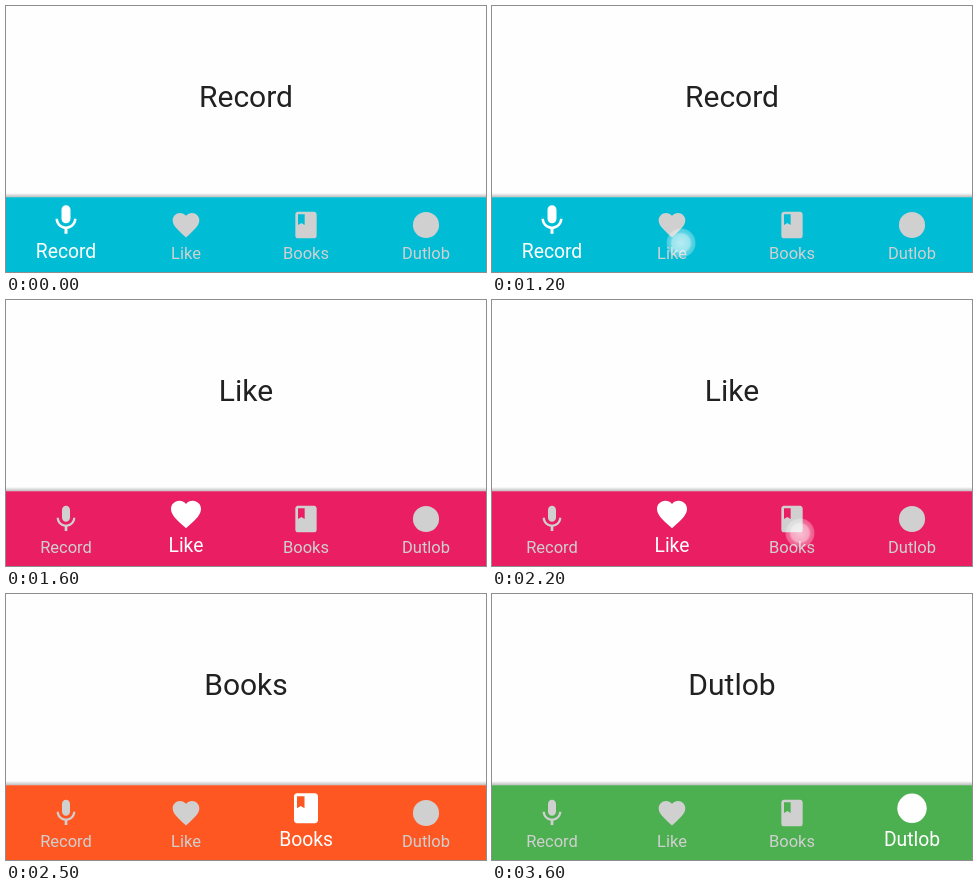
Recreate the animation shown at these times as an HTML page. Size 480 by 266 pixels, loop 4.4 s.

```html
<!DOCTYPE html>
<html lang="en">
<head>
<meta charset="utf-8">
<title>Bottom navigation</title>
<style>
  html, body { margin: 0; width: 100%; height: 100%; overflow: hidden; background: #fefefe; }
  svg { display: block; width: 100%; height: 100%; }
  text { font-family: Roboto, "Noto Sans", sans-serif; text-anchor: middle; }
  #title { font-size: 30px; fill: #212121; }
</style>
</head>
<body>
<svg viewBox="0 0 480 266">
  <defs>
    <linearGradient id="shade" x1="0" y1="0" x2="0" y2="1">
      <stop offset="0" stop-color="#000" stop-opacity="0"/>
      <stop offset="1" stop-color="#000" stop-opacity=".28"/>
    </linearGradient>
    <radialGradient id="glow">
      <stop offset="0" stop-color="#fff" stop-opacity=".72"/>
      <stop offset=".62" stop-color="#fff" stop-opacity=".6"/>
      <stop offset=".75" stop-color="#fff" stop-opacity=".36"/>
      <stop offset="1" stop-color="#fff" stop-opacity=".26"/>
    </radialGradient>
    <clipPath id="barClip"><rect y="191.5" width="480" height="75"/></clipPath>
  </defs>
  <rect width="480" height="266" fill="#fefefe"/>
  <text id="title" x="240" y="101"></text>
  <rect y="187" width="480" height="4.5" fill="url(#shade)"/>
  <g clip-path="url(#barClip)">
    <rect id="bar" y="191" width="480" height="75"/>
    <circle id="press" cy="229"/>
    <circle id="reveal" cy="229"/>
    <g id="tabs"></g>
    <circle id="touch" r="14.5" fill="url(#glow)"/>
  </g>
</svg>
<script>
  const LOOP = 4400, STEP = 100;
  const tabs = [
    { name: 'Record', color: '#00bcd4', icon: '<path d="M12 14c1.66 0 3-1.34 3-3V5c0-1.66-1.34-3-3-3S9 3.34 9 5v6c0 1.66 1.34 3 3 3zm5.3-3c0 3-2.54 5.1-5.3 5.1S6.7 14 6.7 11H5c0 3.41 2.72 6.23 6 6.72V21h2v-3.28c3.28-.48 6-3.3 6-6.72z"/>' },
    { name: 'Like', color: '#e91e63', icon: '<path d="M12 21.35l-1.45-1.32C5.4 15.36 2 12.28 2 8.5 2 5.42 4.42 3 7.5 3c1.74 0 3.41.81 4.5 2.09C13.09 3.81 14.76 3 16.5 3 19.58 3 22 5.42 22 8.5c0 3.78-3.4 6.86-8.55 11.54z"/>' },
    { name: 'Books', color: '#ff5722', icon: '<path d="M18 2H6c-1.1 0-2 .9-2 2v16c0 1.1.9 2 2 2h12c1.1 0 2-.9 2-2V4c0-1.1-.9-2-2-2zM6 4h5v8l-2.5-1.5L6 12z"/>' },
    { name: 'Dutlob', color: '#4caf50', icon: '<circle cx="12" cy="12" r="9.8"/>' }
  ];
  // down: finger lands, at: the tab is chosen
  const picks = [
    { tab: 0, down: -2000, at: -1800, x: 60, y: 229 },
    { tab: 1, down: 1200, at: 1355, x: 189, y: 237 },
    { tab: 2, down: 2200, at: 2255, x: 308, y: 233 },
    { tab: 3, down: 3200, at: 3355, x: 432, y: 228 }
  ];

  const $ = id => document.getElementById(id);
  const set = (el, attrs) => { for (const k in attrs) el.setAttribute(k, attrs[k]); };
  const clamp = v => Math.min(1, Math.max(0, v));
  const ease = v => (1 - Math.cos(Math.PI * clamp(v))) / 2;
  const mix = (a, b, p) => a + (b - a) * p;
  const tabX = i => 60 + 120 * i;

  $('tabs').innerHTML = tabs.map((tab, i) =>
    `<g><g>${tab.icon}</g><text x="${tabX(i)}">${tab.name}</text></g>`).join('');
  const views = [...$('tabs').children];

  function drawTab(i, p) {
    const [icon, label] = views[i].children;
    const size = mix(4 / 3, 1.5, p);
    const tone = Math.round(mix(208, 255, p));
    set(views[i], { fill: `rgb(${tone},${tone},${tone})` });
    set(icon, { transform: `translate(${tabX(i)} ${mix(219, 214.3, p)}) scale(${size}) translate(-12 -12)` });
    set(label, { y: mix(252.5, 251.5, p), 'font-size': mix(16.5, 19.3, p) });
  }

  function draw(t) {
    const n = picks.filter(pick => pick.at <= t).length - 1;
    const now = picks[n], old = picks[Math.max(0, n - 1)];
    const x = tabX(now.tab);
    const reach = Math.hypot(Math.max(x, 480 - x), 38);
    const swap = ease((t - now.at) / 200);

    if ($('title').textContent !== tabs[now.tab].name) $('title').textContent = tabs[now.tab].name;
    const spread = ease((t - now.at) / 250);
    set($('bar'), { fill: tabs[spread > .98 ? now.tab : old.tab].color });
    set($('reveal'), { cx: x, r: reach * spread, fill: tabs[now.tab].color });
    tabs.forEach((_, i) => drawTab(i, i === now.tab ? swap : i === old.tab ? 1 - swap : 0));

    const last = picks.filter(pick => pick.down <= t).pop();
    const held = t - last.down;
    const lift = last.at + 60;
    set($('touch'), { cx: last.x, cy: last.y, opacity: t < lift ? 1 : 0 });
    set($('press'), {
      cx: mix(last.x, tabX(last.tab), .75),
      r: 52 * clamp(held / 200),
      fill: '#607d8b',
      opacity: .1 * (1 - clamp((t - lift) / 100))
    });
  }

  const start = performance.now();
  function tick() {
    const t = (performance.now() - start) % LOOP;
    draw(Math.floor(t / STEP) * STEP);
    requestAnimationFrame(tick);
  }
  tick();
</script>
</body>
</html>
```
